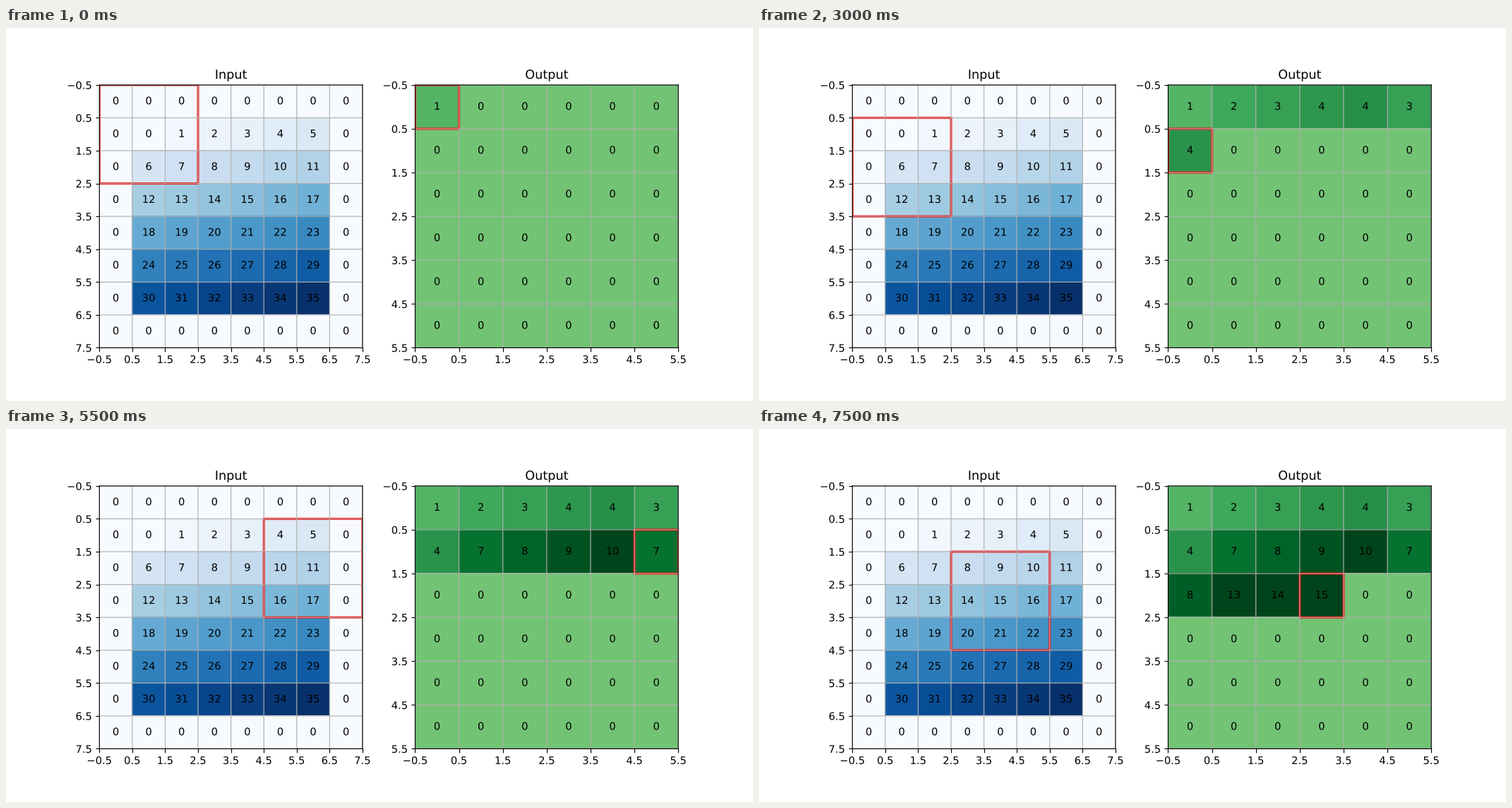
These frames come from a looping animation (1058 px wide and 529 px high, 8 s). A matplotlib script:

```python
import matplotlib.pyplot as plt
import numpy as np
from matplotlib.animation import FuncAnimation
from matplotlib.patches import Rectangle
from matplotlib.patheffects import Normal

STEPS = 16
STEP_MS = 500
SIZE, KERNEL = 6, 3

grid_in = np.pad(np.arange(SIZE * SIZE).reshape(SIZE, SIZE), 1)
means = np.array([[grid_in[r:r + KERNEL, c:c + KERNEL].mean()
                   for c in range(SIZE)] for r in range(SIZE)])

# Keep lines and glyphs at their true sub-pixel positions.
plt.rcParams.update({"font.family": "DejaVu Sans",
                     "text.hinting": "none",
                     "path.snap": False,
                     "path.effects": [Normal()]})
fig, (ax_in, ax_out) = plt.subplots(1, 2, figsize=(10, 5), dpi=105.8)


def draw_panel(ax, data, title, cmap, vmin, vmax):
    """Show a matrix with grid lines on the cell borders and a number per cell."""
    n = len(data)
    image = ax.imshow(data, cmap=cmap, vmin=vmin, vmax=vmax)
    ax.set_title(title)
    borders = np.arange(n + 1) - 0.5
    ax.set_xticks(borders)
    ax.set_yticks(borders)
    ax.grid(True)
    labels = [ax.text(c, r, str(int(data[r, c])), ha="center", va="center")
              for r in range(n) for c in range(n)]
    return image, labels


def add_marker(ax, side):
    box = Rectangle((-0.5, -0.5), side, side, fill=False,
                    edgecolor="red", linewidth=2)
    return ax.add_patch(box)


draw_panel(ax_in, grid_in, "Input", "Blues", 0, 35)
image, labels = draw_panel(ax_out, np.zeros((SIZE, SIZE)), "Output",
                           "Greens", -10, 10)
window = add_marker(ax_in, KERNEL)
cell = add_marker(ax_out, 1)


def update(step):
    row, col = divmod(step, SIZE)
    done = np.arange(SIZE * SIZE).reshape(SIZE, SIZE) <= step
    result = np.where(done, means, 0)
    image.set_data(result)
    for label, value in zip(labels, result.flat):
        label.set_text(str(int(value + 1e-9)))
    for marker in (window, cell):
        marker.set_xy((col - 0.5, row - 0.5))
    return [image, window, cell, *labels]


anim = FuncAnimation(fig, update, frames=STEPS, interval=STEP_MS,
                     repeat=True, repeat_delay=0)
plt.show()
```
